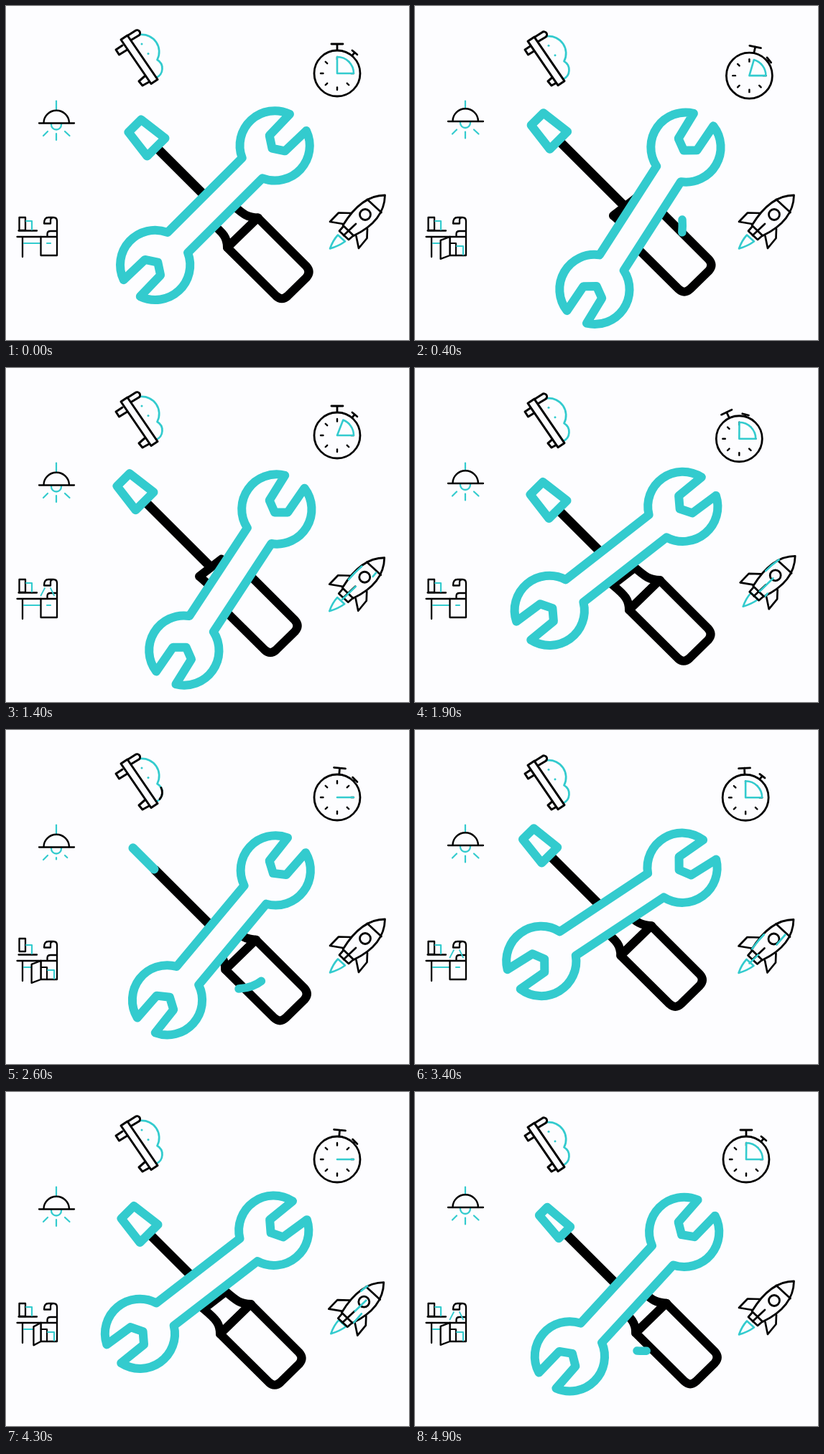
These frames come from a looping animation (561x466 px, 5 s). An HTML page with a canvas:

```html
<!DOCTYPE html>
<html lang="en">
<head>
<meta charset="utf-8">
<title>Tools</title>
<style>
  html, body { margin: 0; width: 100%; height: 100%; overflow: hidden; background: #fdfdff; }
  canvas { display: block; width: 561px; height: 466px; }
</style>
</head>
<body>
<canvas id="stage"></canvas>
<script>
const W = 561, H = 466, LOOP = 5, STEP = 0.1;
const BG = '#fdfdff', INK = '#000', TEAL = '#33cbce';
const cv = document.getElementById('stage');
const ctx = cv.getContext('2d');
const dpr = window.devicePixelRatio || 1;
cv.width = W * dpr;
cv.height = H * dpr;

const { sin, cos, PI, min, max } = Math;
const rad = d => d * PI / 180;
const clamp = v => min(1, max(0, v));
// eased 0 to 1 between times a and b
const ramp = (t, a, b) => (1 - cos(PI * clamp((t - a) / (b - a)))) / 2;
// rises from a to b, falls from c to d
const pulse = (t, a, b, c, d) => ramp(t, a, b) - ramp(t, c, d);

function draw(d, color = INK, width = 2.7, fill) {
  const p = new Path2D(d);
  if (fill) { ctx.fillStyle = fill; ctx.fill(p); }
  ctx.strokeStyle = color;
  ctx.lineWidth = width;
  ctx.stroke(p);
}

// strokes only the stretch from a to b (fractions of len)
function trim(d, len, a, b, color, width) {
  if (b - a < 0.02) return;
  ctx.save();
  ctx.setLineDash([(b - a) * len, 9999]);
  ctx.lineDashOffset = -a * len;
  draw(d, color, width);
  ctx.restore();
}

function at(x, y, deg, fn) {
  ctx.save();
  ctx.translate(x, y);
  ctx.rotate(rad(deg));
  fn();
  ctx.restore();
}

const dot = (x, y) => draw(`M${x} ${y}h.01`, TEAL, 3);

const HEAD = 48.5;
const WRENCH = `M29 -16.3A${HEAD} ${HEAD} 0 0 0 -61 -20H-208A${HEAD} ${HEAD} 0 0 0 -298 -16.3` +
  `L-257 -15.3L-247 0L-257 15.3L-298 16.3A${HEAD} ${HEAD} 0 0 0 -208 20H-61` +
  `A${HEAD} ${HEAD} 0 0 0 29 16.3L-12 15.3L-22 0L-12 -15.3Z`;
const SPIN = 'M309 361C354 364 375 343 372 298';

function driver(t) {
  const up = ramp(t, 0, .9), mid = ramp(t, .9, 1.9), home = ramp(t, 1.9, 2.395);
  at(-22 * up + 12 * mid + 10 * home, -23 * up + 23.5 * mid - .5 * home, 0, () => {
    ctx.lineCap = 'butt';
    draw('M209 197L304 292', INK, 13);
    ctx.lineCap = 'round';
    draw('M285 302C303 317 308 323 308 337L351 295.5C336 295 331 291 316 278Z', INK, 12, BG);
    draw('M308 337L350.500 295.500L418 363Q425 371 418 379L392 404.500Q384 412 376 404.500Z', INK, 12, BG);
    // flat blade seen while it turns about the shaft
    const turn = 360 * (1 - (1 - clamp(t / 1.3)) ** 1.7);
    const w = Math.abs(cos(rad(turn))), a = 12.4 * w, b = 17.7 * w;
    at(209, 197, 45, () => draw(`M-42 ${-a}L0 ${-b}V${b}L-42 ${a}Z`, TEAL, 12, BG));
  });
  trim(SPIN, 110, clamp(3.4 * (t - .165)), clamp(3.4 * (t - .075)), TEAL, 11.5);
}

function tools(time) {
  const span = 2.395, t = time % span, u = t / span;
  driver(t);
  const late = u < 1 / 3 ? .075 * sin(3 * PI * u) : 0;
  const tilt = 45 + 13.5 * sin(4 * PI * (u - late));
  at(386, 183, -tilt, () => draw(WRENCH, TEAL, 12, BG));
}

const CLOUD = 'M187 40A24 24 0 0 1 210.500 75A14 14 0 0 1 209 100';

function board(time) {
  const t = time % 1.5, k = pulse(t, 0, .3, .42, .6);
  draw('M162 55L153 61L157.500 68L168 61.500', INK, 3);
  draw('M193 98L185 105L190 111L200 105.500', INK, 3);
  at(-3 * k, 2.2 * k, 0, () => {
    draw(CLOUD, TEAL);
    trim(CLOUD, 76, clamp((t - .79) * 2.5), clamp((t - .6) * 2.3), INK, 2.8);
    dot(189, 53);
    dot(198, 66.5);
    draw('M162 46L180 34.500A4 4 0 0 1 185 41L170 50', INK, 3, BG);
    draw('M160 47L169 41L211 102.500L202 108.500Z', INK, 3, BG);
  });
}

function lamp(time) {
  const t = time % 1.5, y = -2.5 * pulse(t, 0, .3, .42, .6);
  draw(`M70 132.500V${145 + y}`, TEAL, 2.2);
  at(0, y, 0, () => {
    draw('M63 164V165.500A7 7 0 0 0 77 165.500V164', t > .62 && t < .98 ? INK : TEAL, 2.3);
    draw('M52.500 163A17.700 17.200 0 0 1 87.900 163', INK, 2.4);
    draw('M46 163.500H95', INK, 2.3);
    // each ray leaves outward, then grows again from the bulb
    const ray = (d, len, go, come) =>
      trim(d, len, t < 1 ? ramp(t, go, go + .25) : 0, t < 1 ? 1 : ramp(t, come, come + .2), TEAL, 2.2);
    ray('M58 175L52 181', 8.5, .61, .9);
    ray('M70 178V187', 9, .74, 1.03);
    ray('M82 175L88.500 181', 8.9, .74, 1);
  });
}

function desk(time) {
  const t = time % 2;
  const open = 125 * pulse(t, .05, .35, .95, 1.2);
  const hop = 4 * pulse(t, .4, .6, .6, .78);
  const light = pulse(t, .74, .9, 1.42, 1.65);
  draw('M17.500 313.500H43', INK, 2.3);
  draw(`M18.500 ${295 - hop}H27V${313 - hop}H18.500Z`, INK, 2.3);
  draw('M28 300H36V312', TEAL, 2.2);
  draw('M15.500 322H71M23 322V350', INK, 2.3);
  draw('M25 331H47', TEAL, 2.2);
  draw('M48.500 322V348H71V300Q71 295 66 295H59Q53 295 53 303.500H62V299Q62 295 66 295', INK, 2.3);
  draw('M57.500 321V318Q57.500 314 62 314H71', INK, 2.3);
  trim('M54 307L48.500 317.500', 11.9, 0, light, TEAL, 1.8);
  trim('M62 307L67 317.500', 11.6, 0, light, TEAL, 1.8);
  if (open < 3) return draw('M57 331H62', TEAL, 2.2);
  draw('M49 331H57V347', INK, 2);
  draw('M58 335H67V347', TEAL, 2);
  const x = 48.5 + 22.5 * cos(rad(open)), s = 6 * sin(rad(open));
  draw(`M48.500 322L${x} ${322 + s}V${348 + s}L48.500 348Z`, INK, 2.3, BG);
}

function watch(time) {
  const t = time % (5 / 3);
  // damped shake, then a small lean while the button stays down
  const s = clamp((t - .06) / .87);
  const shake = -31 * (1 - .7 * s) * sin(3 * PI * s);
  const x = 461 + .38 * shake, y = 94 + 5 * sin(2 * PI * s);
  const push = 3 * pulse(t, .067, .2, .98, 1.3);
  const pie = 90 * (1 - pulse(t, .2, .92, .98, 1.6));
  at(x, y, shake + 5 * pulse(t, .83, .92, .97, 1.3), () => {
    draw('M0 -32V-41M-8 -41H8', INK, 2.8);
    ctx.rotate(rad(40));
    draw(`M0 -32V${-38 + push}M-4.500 ${-38 + push}H4.500`, INK, 2.8);
  });
  at(x, y, 6 * pulse(t, .5, .8, .8, .92), () => {
    draw('M-32 0A32 32 0 1 1 32 0A32 32 0 1 1 -32 0Z', INK, 2.8, BG);
    for (let i = 0; i < 8; i++) at(0, 0, i * 45, () => draw('M0 -19.500V-23', INK, 2.4));
    const px = 23 * cos(rad(pie)), py = -23 * sin(rad(pie));
    draw(`M0 0L${px} ${py}A23 23 0 0 1 23 0Z`, TEAL, 2.6, BG);
  });
}

// a light streak running down a lane of the hull
function streak(d, len, t, offset) {
  const p = (2.5 * t + offset) % 1.5 - .3;
  trim(d, len, clamp(p - .25), clamp(p + .25), TEAL, 2.7);
}

function rocket(time) {
  const t = time % 2.5, flying = t > .6 && t < 2.3;
  const s = flying ? 2 * sin(2 * PI * 3.2 * (t - .6)) : 0;
  const pull = 4 * pulse(t, 1.6, 1.9, 1.9, 2.2);
  at(s, -s, 0, () => {
    at(pull, -pull, 0, () =>
      draw('M462 319.500Q455 327 451 338.500Q463 335 472 328.500Z', TEAL, 2.6, BG));
    draw('M480 289L463 288.500L451 301L469 304');
    draw('M503 311L502.500 324L491 338L487.500 321');
    draw('M470 307L464 314L477 326L484 320');
    draw('M469 306C483 283 501 264 527.500 264C527 291 508 309 484 320.500Z', INK, 2.8, BG);
    draw('M503 270L522.500 288');
    draw('M492.500 291A7.500 7.500 0 1 1 507.500 291A7.500 7.500 0 1 1 492.500 291Z', INK, 2.8);
    draw('M487 304L470 320');
    if (!flying || t < .85) return;
    streak('M505 269Q485 283 469 306', 52, t, .27);
    streak('M503 289L466 325', 51.6, t, .47);
    streak('M516 285L486 320', 46, t, 1.2);
  });
}

function frame(now) {
  const time = Math.floor(now / 1000 % LOOP / STEP + 1e-6) * STEP;
  ctx.setTransform(dpr, 0, 0, dpr, 0, 0);
  ctx.fillStyle = BG;
  ctx.fillRect(0, 0, W, H);
  ctx.lineCap = ctx.lineJoin = 'round';
  [board, lamp, desk, watch, rocket, tools].forEach(icon => icon(time));
}

const start = performance.now();
(function tick() {
  frame(performance.now() - start);
  requestAnimationFrame(tick);
})();
</script>
</body>
</html>
```
